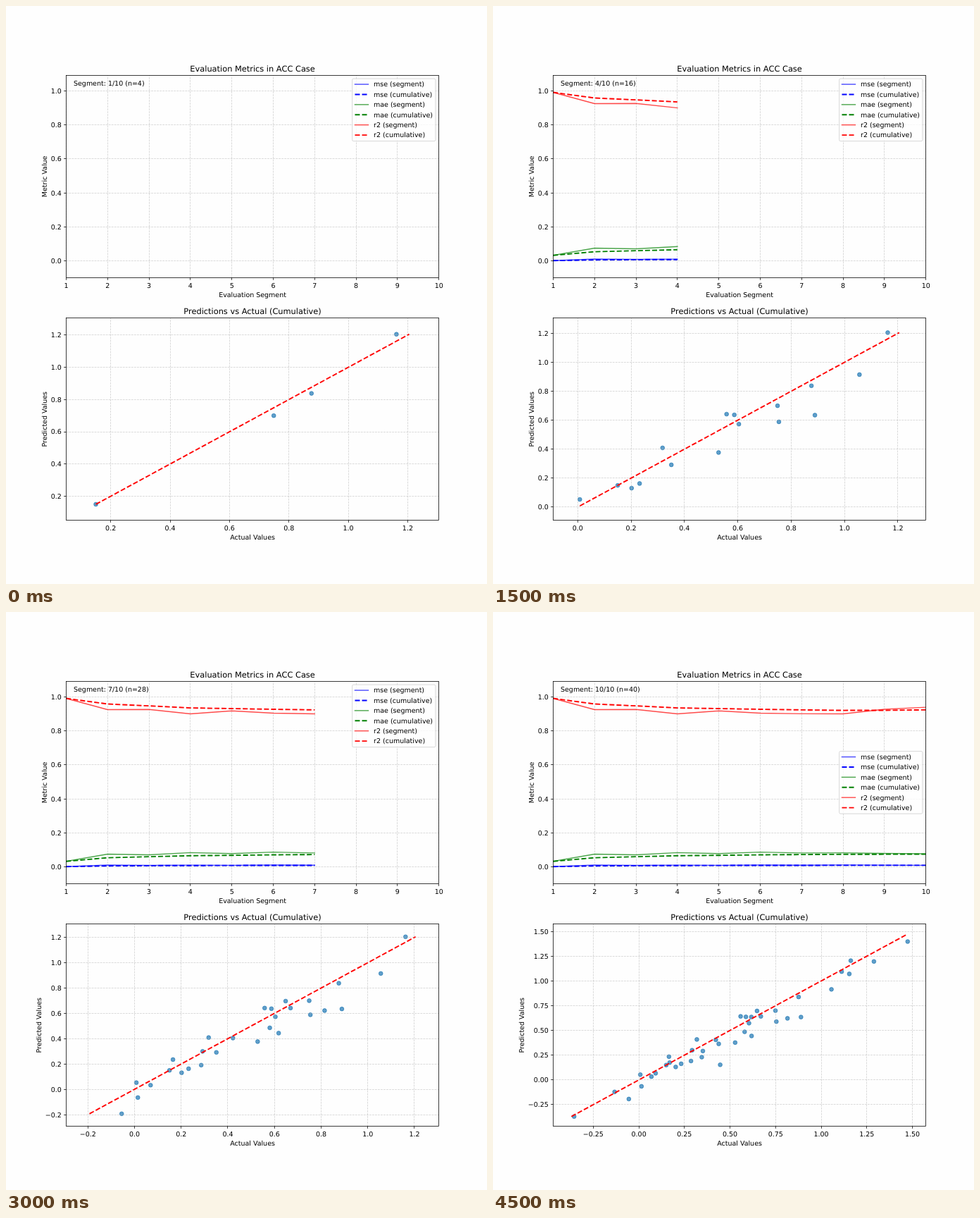
Recreate the animation shown at these times as an HTML page with a canvas. Size 683 by 820 pixels, loop 5 s.

```html
<!DOCTYPE html>
<html lang="en">
<head>
<meta charset="utf-8">
<title>Evaluation metrics</title>
<style>
html, body { margin: 0; width: 100%; height: 100%; overflow: hidden; background: #fefefe; }
canvas { display: block; }
</style>
</head>
<body>
<canvas id="stage" width="683" height="820"></canvas>
<script>
const ctx = document.getElementById('stage').getContext('2d');
const STEP_MS = 500, SEGMENTS = 10;
const EM = 9.49, PT = EM / 10;
const LEFT = 85.4, RIGHT = 614.7;
const TOP_PLOT = { top: 98.4, bottom: 385.4 };
const LOW_PLOT = { top: 442.8, bottom: 729.8 };

const METRICS = [
  { name: 'mse', color: '#0000ff',
    seg: [.0017, .011, .009, .0105, .0095, .011, .01, .0115, .0105, .0095],
    cum: [.0017, .006, .0075, .008, .0085, .009, .009, .0095, .0095, .0095] },
  { name: 'mae', color: '#008000',
    seg: [.033, .075, .071, .084, .078, .087, .082, .083, .079, .077],
    cum: [.033, .054, .06, .066, .068, .071, .0725, .074, .0745, .0748] },
  { name: 'r2', color: '#ff0000',
    seg: [.99, .924, .925, .899, .917, .903, .8995, .899, .926, .938],
    cum: [.99, .957, .946, .934, .93, .926, .9225, .9195, .92, .9225] }
];

// four [actual, predicted] pairs per segment
const POINTS = [
  [.15, .15], [.749, .7], [.876, .838], [1.162, 1.205],
  [.008, .053], [.604, .573], [.889, .635], [1.056, .915],
  [.587, .637], [.232, .163], [.528, .377], [.318, .409],
  [.558, .642], [.351, .292], [.202, .131], [.754, .589],
  [.648, .697], [.292, .3], [.069, .033], [-.055, -.193],
  [.815, .622], [.0145, -.065], [.58, .486], [.422, .405],
  [.669, .642], [.618, .444], [.165, .235], [.286, .191],
  [-.355, -.37], [.446, .153], [.092, .067], [.617, .636],
  [1.289, 1.197], [-.133, -.121], [.345, .23], [.438, .364],
  [1.474, 1.398], [1.112, 1.094], [1.154, 1.071], [.169, .175]
];

const crisp = v => Math.floor(v) + .5;

function scale(lo, hi, from, to) {
  return v => from + (v - lo) / (hi - lo) * (to - from);
}

function text(str, x, y, align = 'center', size = EM) {
  ctx.font = `${size}px "DejaVu Sans", sans-serif`;
  ctx.textAlign = align;
  ctx.fillStyle = '#000';
  ctx.fillText(str, x, y);
}

function line(pts, color, width, { alpha = 1, dash = false, cap = 'butt' } = {}) {
  ctx.save();
  ctx.globalAlpha = alpha;
  ctx.strokeStyle = color;
  ctx.lineWidth = width;
  ctx.lineJoin = 'round';
  ctx.lineCap = cap;
  if (dash) ctx.setLineDash([3.7 * width, 1.6 * width]);
  ctx.beginPath();
  pts.forEach(([x, y]) => ctx.lineTo(x, y));
  ctx.stroke();
  ctx.restore();
}

const solidLine = (pts, color) => line(pts, color, 1.5 * PT, { alpha: .7, cap: 'square' });
const dashedLine = (pts, color) => line(pts, color, 2 * PT, { dash: true });

function clipped(plot, draw) {
  ctx.save();
  ctx.beginPath();
  ctx.rect(LEFT, plot.top, RIGHT - LEFT, plot.bottom - plot.top);
  ctx.clip();
  draw();
  ctx.restore();
}

function grid(plot, xs, ys, sx, sy) {
  const style = { alpha: .6, dash: true };
  xs.forEach(v => {
    const x = crisp(sx(v));
    line([[x, plot.bottom], [x, plot.top]], '#b0b0b0', .8 * PT, style);
  });
  ys.forEach(v => {
    const y = crisp(sy(v));
    line([[LEFT, y], [RIGHT, y]], '#b0b0b0', .8 * PT, style);
  });
}

function frame(plot, xs, ys, sx, sy, xFormat, yFormat, labels) {
  const tick = 3.5 * PT, gap = 7 * PT;
  const l = crisp(LEFT), r = crisp(RIGHT), t = crisp(plot.top), b = crisp(plot.bottom);
  let widest = 0;
  xs.forEach(v => {
    const x = crisp(sx(v));
    line([[x, b], [x, b + tick]], '#000', .8 * PT);
    text(xFormat(v), sx(v), plot.bottom + 14.2);
  });
  ys.forEach(v => {
    const y = crisp(sy(v)), str = yFormat(v);
    line([[l, y], [l - tick, y]], '#000', .8 * PT);
    text(str, LEFT - gap, sy(v) + .365 * EM, 'right');
    widest = Math.max(widest, ctx.measureText(str).width);
  });
  ctx.strokeStyle = '#000';
  ctx.lineWidth = .8 * PT;
  ctx.strokeRect(l, t, r - l, b - t);

  const mid = (LEFT + RIGHT) / 2;
  text(labels.title, mid, plot.top - 5.7, 'center', 1.2 * EM);
  text(labels.x, mid, plot.bottom + 27.4);
  ctx.save();
  ctx.translate(LEFT - gap - widest - 6, (plot.top + plot.bottom) / 2);
  ctx.rotate(-Math.PI / 2);
  text(labels.y, 0, 0);
  ctx.restore();
}

function legend(top) {
  const right = RIGHT - .5 * EM, left = right - 118.3;
  ctx.beginPath();
  ctx.roundRect(left, top, right - left, 88.6, .2 * EM);
  ctx.fillStyle = 'rgba(254,254,254,.8)';
  ctx.fill();
  ctx.strokeStyle = 'rgba(204,204,204,.8)';
  ctx.lineWidth = PT;
  ctx.stroke();
  const x0 = left + .4 * EM, x1 = x0 + 2 * EM;
  METRICS.forEach((m, i) => {
    [['segment', solidLine], ['cumulative', dashedLine]].forEach(([kind, draw], j) => {
      const base = top + 11.3 + 14.4 * (2 * i + j);
      const y = base - .35 * EM;
      draw([[x0, y], [x1, y]], m.color);
      text(`${m.name} (${kind})`, x1 + .8 * EM, base, 'left');
    });
  });
}

function drawMetrics(n) {
  const p = TOP_PLOT;
  const sx = scale(1, SEGMENTS, LEFT, RIGHT);
  const sy = scale(-.0983, 1.09, p.bottom, p.top);
  const xs = Array.from({ length: SEGMENTS }, (_, i) => i + 1);
  const ys = [0, .2, .4, .6, .8, 1];
  const path = vals => vals.slice(0, n).map((v, i) => [sx(i + 1), sy(v)]);
  clipped(p, () => {
    grid(p, xs, ys, sx, sy);
    if (n > 1) METRICS.forEach(m => {
      solidLine(path(m.seg), m.color);
      dashedLine(path(m.cum), m.color);
    });
  });
  frame(p, xs, ys, sx, sy, String, v => v.toFixed(1), {
    title: 'Evaluation Metrics in ACC Case', x: 'Evaluation Segment', y: 'Metric Value'
  });
  text(`Segment: ${n}/${SEGMENTS} (n=${4 * n})`, 96, p.top + 14.4, 'left');
  // the legend drops to the middle once the curves reach its corner
  legend(n < 8 ? 103.1 : 197.6);
}

function ticks(lo, hi) {
  const step = [.1, .2, .25, .5].find(s => s >= (hi - lo) / 9);
  const out = [];
  for (let i = Math.ceil(lo / step); i * step <= hi; i++) out.push(i * step);
  const digits = step === .25 ? 2 : 1;
  return { values: out, format: v => v.toFixed(digits).replace('-', '\u2212') };
}

function drawScatter(n) {
  const p = LOW_PLOT;
  const pts = POINTS.slice(0, 4 * n);
  const lo = Math.min(...pts.flat()), hi = Math.max(...pts.flat());
  const sx = scale(lo - .1, hi + .1, LEFT, RIGHT);
  const sy = scale(lo - .1, hi + .1, p.bottom, p.top);
  const { values, format } = ticks(lo - .1, hi + .1);
  clipped(p, () => {
    ctx.save();
    ctx.globalAlpha = .7;
    ctx.fillStyle = ctx.strokeStyle = '#1f77b4';
    ctx.lineWidth = PT;
    pts.forEach(([x, y]) => {
      ctx.beginPath();
      ctx.arc(sx(x), sy(y), 3 * PT, 0, 2 * Math.PI);
      ctx.fill();
      ctx.stroke();
    });
    ctx.restore();
    grid(p, values, values, sx, sy);
    dashedLine([[sx(lo), sy(lo)], [sx(hi), sy(hi)]], '#ff0000');
  });
  frame(p, values, values, sx, sy, format, format, {
    title: 'Predictions vs Actual (Cumulative)', x: 'Actual Values', y: 'Predicted Values'
  });
}

let shown = 0;
function loop() {
  const n = Math.floor(performance.now() / STEP_MS) % SEGMENTS + 1;
  if (n !== shown) {
    shown = n;
    ctx.textRendering = 'geometricPrecision';
    ctx.fillStyle = '#fefefe';
    ctx.fillRect(0, 0, 683, 820);
    drawMetrics(n);
    drawScatter(n);
  }
  requestAnimationFrame(loop);
}
loop();
</script>
</body>
</html>
```
